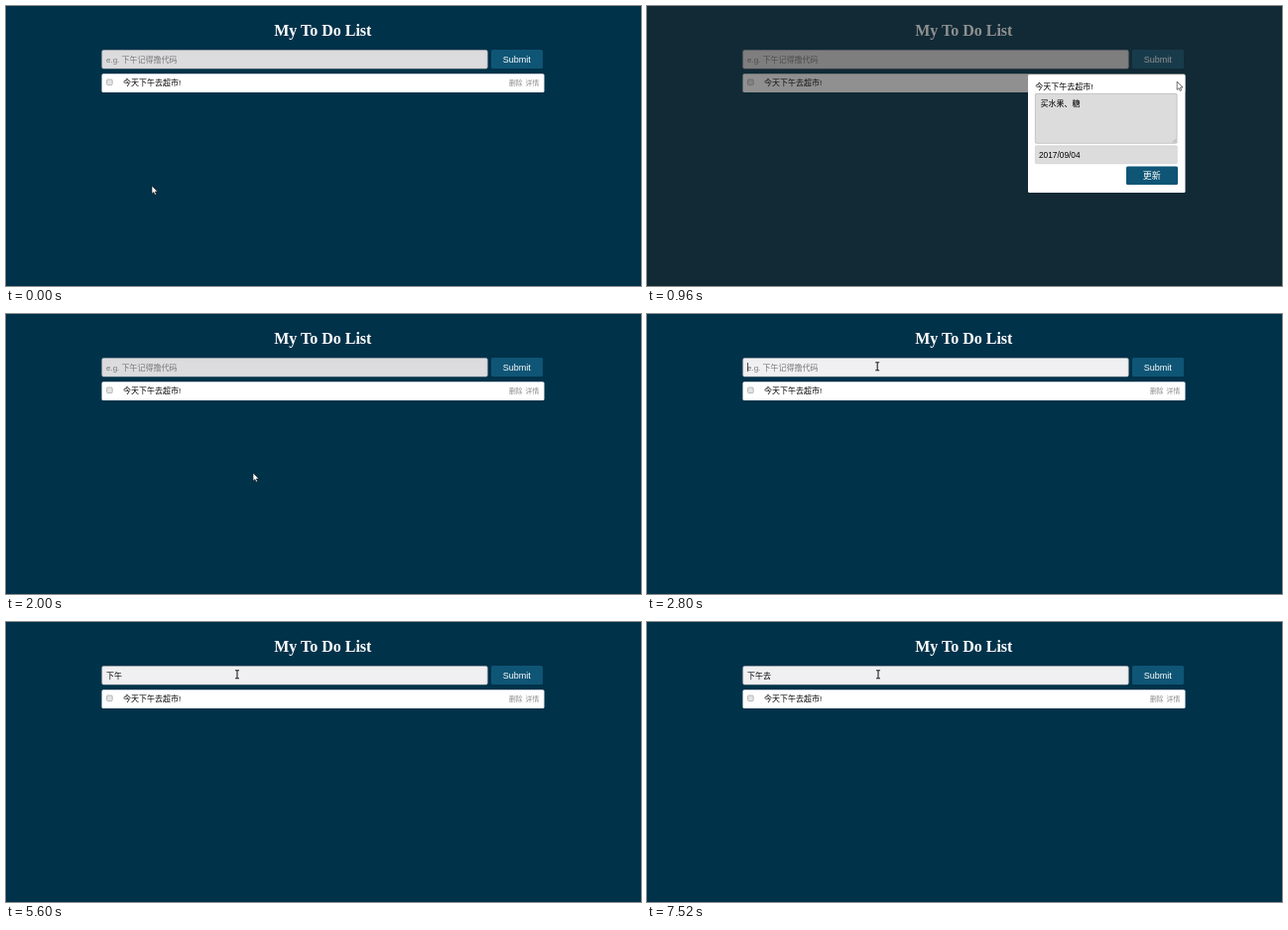
Animation, 640 px wide and 282 px high, one loop 8000 ms. Source, as an HTML page:

```html
<!DOCTYPE html>
<html lang="zh-CN">
<head>
<meta charset="utf-8">
<title>My To Do List</title>
<style>
  html, body { margin: 0; width: 100%; height: 100%; overflow: hidden; background: #00324a; }
  svg { display: block; width: 100%; height: 100%; }
  text { font: 8px "Liberation Sans", "Noto Sans CJK SC", "Noto Sans CJK", sans-serif; fill: #000; white-space: pre; }
  .title { font: bold 16px "Liberation Serif", serif; fill: #fff; text-anchor: middle; }
  .button { font-size: 9px; fill: #fff; text-anchor: middle; }
  .link { font-size: 6.8px; fill: #888; }
  .hint { fill: #777; }
  .date { font-size: 8.3px; }
  .ime text { font: 8.8px "Noto Sans CJK SC", "Noto Sans CJK", "DejaVu Sans", sans-serif; fill: #0a7fdb; }
  .ime .typed { font-size: 9.5px; }
  .ime .first, .ime .bar { fill: #ee1520; }
</style>
</head>
<body>
<svg viewBox="0 0 640 282">
  <rect width="640" height="282" fill="#00324a"/>
  <text class="title" x="319.3" y="30">My To Do List</text>

  <rect id="field" x="96.75" y="44.5" width="388.5" height="18.5" rx="1.5" stroke="#b5b5b8" stroke-width=".6"/>
  <text id="hint" class="hint" x="101" y="56.5">e.g. 下午记得撸代码</text>
  <text id="value" x="101" y="56.5"></text>
  <path id="underline" stroke="#000" stroke-width=".6"/>
  <path id="caret" stroke="#000" stroke-width=".7"/>
  <rect x="489" y="44" width="52" height="19" rx="1.5" fill="#0f5575"/>
  <text class="button" x="514.8" y="56.6">Submit</text>

  <rect x="96.5" y="68.2" width="446" height="18.8" rx="1.5" fill="#fff"/>
  <rect x="101.6" y="74" width="5.6" height="5.6" rx="1" fill="#e4e4e4" stroke="#a0a0a0" stroke-width=".7"/>
  <text x="118" y="80.2">今天下午去超市!</text>
  <text class="link" x="507" y="80">删除</text>
  <text class="link" x="523.6" y="80">详情</text>

  <g id="details">
    <rect width="640" height="282" fill="#222" opacity=".5"/>
    <rect x="384" y="69" width="158.5" height="119" rx="1.5" fill="#fff"/>
    <text x="391.3" y="83.8">今天下午去超市!</text>
    <rect x="391.3" y="88.3" width="142.8" height="50" rx="1" fill="#dcdcdc" stroke="#aaa" stroke-width=".6"/>
    <path d="M530 137.4l3.2-3.2M532 137.4l1.2-1.2" stroke="#777" stroke-width=".5"/>
    <text x="396.5" y="100.8">买水果、糖</text>
    <rect x="391.3" y="140.8" width="143" height="18" rx="1" fill="#dcdcdc" stroke="#c4c4c4" stroke-width=".5"/>
    <text class="date" x="395" y="152.8">2017/09/04</text>
    <rect x="483" y="161.5" width="52" height="18.6" rx="1.5" fill="#0f5575"/>
    <text class="button" x="508.8" y="174.2">更新</text>
  </g>

  <g id="ime" class="ime"></g>

  <g id="pointer">
    <path id="arrow" d="M0 0V8.2L1.9 6.5 3.1 9.2 4.5 8.6 3.3 5.9H5.8Z" fill="#fff" stroke="#111" stroke-width=".6"/>
    <path id="hand" d="M-.8 .6Q0-.6 .8 .6V3.6L4.6 4.5Q5.4 5 5 7L4.2 9.6H-.6L-3 6.2Q-3-5-2.4 5L-.8 6Z" fill="#fff" stroke="#111" stroke-width=".6"/>
    <path id="beam" d="M-2-4.2H2M0-4.2V3.8M-2 3.8H2" fill="none" stroke="#222" stroke-width="1.1"/>
  </g>
</svg>
<script>
const LOOP = 8000, TICK = 80, BLINK = 480;
const el = id => document.getElementById(id);
const show = (id, on) => el(id).style.display = on ? '' : 'none';

// Pointer stops: time, x, y
const stops = [
  [0, 147, 181], [800, 534, 76], [1200, 534.5, 76.5], [1920, 249, 160],
  [2000, 249, 160], [2080, 247, 126], [2560, 231.5, 53]
];

// Input states: start time, committed text, pinyin being typed, candidates
const states = [
  [2560, '', ''],
  [4160, '', 'x', '想 下 项 ( ˅ __ ˅)_想～ 写'],
  [4320, '', 'xi', '系 洗 西 喜欢 细'],
  [4640, '', 'xia', '下 夏 吓 虾 下午'],
  [4720, '', 'xiaw', '下午 下午茶 下屋 夏 下'],
  [4800, '', "xia'wu", '下午 下午茶 下屋 夏 下'],
  [5120, '下午', ''],
  [5680, '下午', 'q', '去 前 请 起 亲亲'],
  [5760, '下午', 'qu', '去 取 区 曲 趣'],
  [6080, '下午去', '']
];
// The face candidate holds spaces of its own
const split = list => list.includes('(')
  ? ['想', '下', '项', '( ˅ __ ˅) 想～', '写'] : list.split(' ');

function pointerAt(t) {
  if (t >= 2560) return [t < 2800 ? 231.5 : t < 4240 ? 232.2 : 233, 53];
  const i = stops.findIndex((s, k) => t < stops[k + 1][0]);
  const [t0, x0, y0] = stops[i], [t1, x1, y1] = stops[i + 1];
  const p = (t - t0) / (t1 - t0), e = p * p * (3 - 2 * p);
  return [x0 + (x1 - x0) * e, y0 + (y1 - y0) * e];
}

const wordWidth = word => [...word].reduce((w, c) => w + (/[\u4e00-\u9fff～]/.test(c) ? 8.8 : 3.6), 14.3);

function imeMarkup(left, typed, words) {
  let x = left + 5.5, items = '';
  words.forEach((word, i) => {
    items += `<text class="${i ? '' : 'first'}" x="${x}" y="95.4">${i + 1}.${word}</text>`;
    x += wordWidth(word);
  });
  const right = x + 30;
  return `<rect x="${left}" y="64.3" width="${right - left}" height="36" fill="#fff" stroke="#b9c3c9" stroke-width=".6"/>
    <text class="typed" x="${left + 5.8}" y="77">${typed}<tspan class="bar">|</tspan></text>
    <rect x="${right - 15}" y="64.5" width="14" height="14" fill="#f3a98c"/>
    <path d="M${right - 26} 87.6v5l-2.8-2.5z" fill="#a9cdea"/>
    <path d="M${right - 20.5} 87v6.4l3.4-3.2z" fill="#0a7fdb"/>${items}`;
}

function drawInput(t) {
  const state = states.filter(s => s[0] <= t).pop();
  const [start, text, typed, list] = state || [0, '', '', ''];
  const caretX = 101.6 + text.length * 8;
  el('field').setAttribute('fill', t >= 2480 ? '#f0eff1' : '#dcdbde');
  el('value').textContent = text + typed;
  show('hint', !text && !typed);
  show('caret', state && (typed || Math.floor((t - start) / BLINK) % 2 === 0));
  el('caret').setAttribute('d', `M${caretX} 49V58`);
  show('underline', typed);
  if (typed) {
    const end = 101 + el('value').getComputedTextLength();
    el('underline').setAttribute('d', `M${caretX - .6} 58H${end}`);
  }
  el('ime').innerHTML = typed ? imeMarkup(caretX - .1, typed, split(list)) : '';
}

function drawPointer(t, open) {
  const [x, y] = pointerAt(t);
  const inField = !open && x > 96 && x < 485 && y > 44 && y < 63;
  const onLink = !open && x > 507 && x < 538 && y > 72 && y < 82;
  el('pointer').setAttribute('transform', `translate(${x} ${y})`);
  show('beam', inField);
  show('hand', onLink);
  show('arrow', !inField && !onLink);
}

let last = -1;
function frame(now) {
  const t = Math.floor(now % LOOP / TICK) * TICK;
  if (t !== last) {
    const open = t >= 960 && t < 2000;
    show('details', open);
    drawInput(t);
    drawPointer(t, open);
    last = t;
  }
  requestAnimationFrame(frame);
}
frame(0);
</script>
</body>
</html>
```
